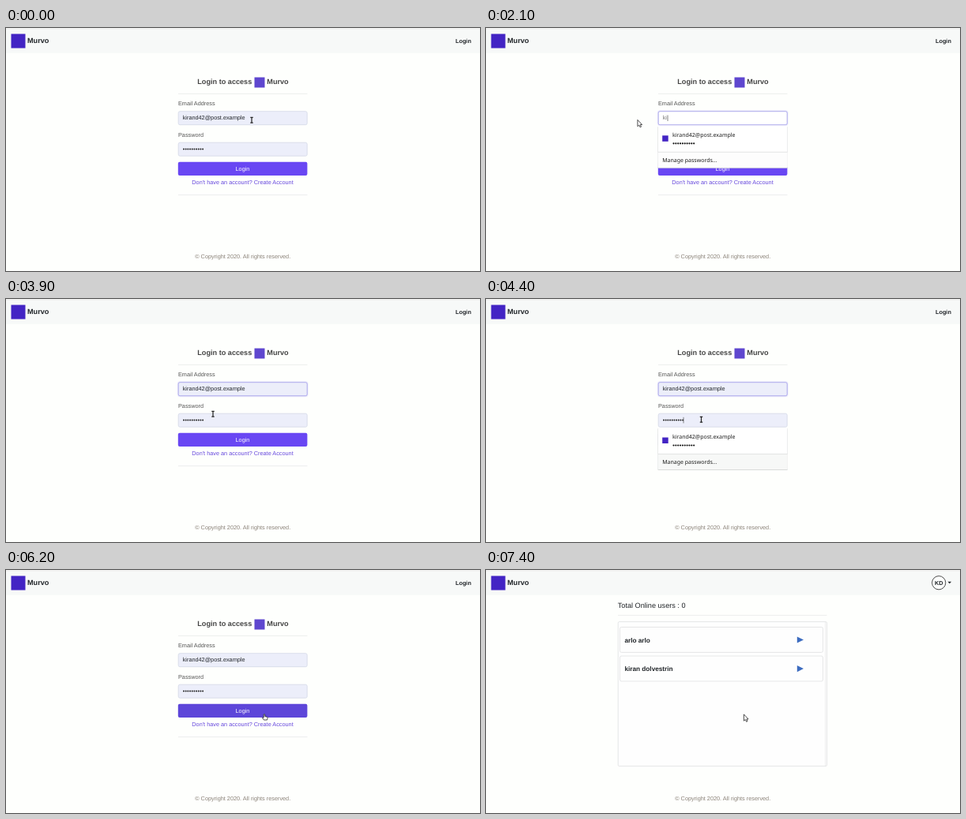
Write an HTML page that moves like this. It is 600 px wide and 308 px high and loops after 8000 ms.

```html
<!DOCTYPE html>
<html lang="en">
<head>
<meta charset="utf-8">
<title>Login</title>
<style>
  html, body { margin: 0; height: 100%; overflow: hidden; background: #fefffd; }
  svg { display: block; width: 100vw; height: 100vh; }
  text { font: 7.3px "Liberation Sans", Arial, sans-serif; fill: #212529; text-rendering: geometricPrecision; white-space: pre; }
  .b { font-weight: bold; }
  .big { font-size: 9.13px; }
  .mid { text-anchor: middle; }
  .label { fill: #555; }
  .ui text { font: 7px "Noto Sans", sans-serif; fill: #1c1c1c; }
  .line { stroke: #e6e7e8; stroke-width: .7; }
  .field { fill: #eceefa; stroke: #d4d8e6; stroke-width: .8; }
  .ring { fill: none; stroke: #7a6cf0; }
  .card { fill: #fefefe; stroke: #dcdddf; stroke-width: .7; }
  .dots { stroke-linecap: round; fill: none; }
  .caret { stroke: #333; stroke-width: .6; }
  #cursor path { stroke: #222; stroke-width: .8; stroke-linejoin: round; fill: #fff; }
  #cursor #beam { stroke-width: 1.2; }
</style>
</head>
<body>
<svg viewBox="0 0 600 308">
  <path d="M0 1H600" stroke="#dfe1e0" stroke-width=".8"/>
  <rect y="2" width="600" height="29.7" fill="#f7f9f8"/>
  <rect x="6.5" y="7.5" width="18" height="18" fill="#4324c4"/>
  <text class="b big" x="27" y="18.8">Murvo</text>
  <text class="mid" x="299.7" y="291.8" style="fill:#8a8178">© Copyright 2020. All rights reserved.</text>

  <g id="login">
    <text class="b" x="569" y="18.8">Login</text>
    <text class="b big" x="242.3" y="71" style="fill:#444">Login to access</text>
    <rect x="314.5" y="62.5" width="13" height="13" fill="#5f47cf"/>
    <text class="b big" x="330.3" y="71" style="fill:#444">Murvo</text>
    <path class="line" d="M218 83.4H381.5M218 211.6H381.5"/>
    <text class="label" x="218" y="98.4">Email Address</text>
    <text class="label" x="218" y="137.8">Password</text>

    <rect id="email" class="field" x="218.2" y="105.7" width="163" height="17" rx="2"/>
    <rect id="selection" y="109" height="10" fill="#b7c8f0"/>
    <text id="typed" x="223.7" y="116.3"></text>
    <path id="emailCaret" class="caret" d="M230 110.5V118"/>
    <g id="emailRing" class="ring">
      <rect x="218.2" y="105.7" width="163" height="17" rx="2" stroke-opacity=".35"/>
      <rect x="217.6" y="105" width="164.2" height="18.4" rx="2.6" stroke-width="1.6" stroke-opacity=".14"/>
    </g>

    <rect class="field" x="218.2" y="145.2" width="163" height="17" rx="2"/>
    <path class="dots" d="M225 153.6H249.5" stroke="#222" stroke-width="2" stroke-dasharray="0 2.68"/>
    <path id="passCaret" class="caret" d="M250 149.8V157.4"/>
    <g id="passRing" class="ring">
      <rect x="218.2" y="145.2" width="163" height="17" rx="2" stroke-opacity=".35"/>
      <rect x="217.6" y="144.5" width="164.2" height="18.4" rx="2.6" stroke-width="1.6" stroke-opacity=".14"/>
    </g>

    <rect id="button" x="217.8" y="169.7" width="163.6" height="17.3" rx="2"/>
    <text class="mid" x="299.5" y="181" style="fill:#fff">Login</text>
    <text class="mid" x="299.5" y="198.4" style="fill:#6546dd">Don't have an account? Create Account</text>

    <g id="popup" class="ui">
      <rect x="217.2" y="124.4" width="164.8" height="53.3" rx="1.5" fill="#d9dbda"/>
      <rect x="217.7" y="123.7" width="163.8" height="53" rx="1" fill="#fff"/>
      <rect id="hover" x="217.7" y="127" width="163.8" height="26.5" fill="#c5c6c2"/>
      <rect id="footer" x="217.7" y="157.5" width="163.8" height="19.2"/>
      <path d="M217.7 157.3H381.5" stroke="#dedfdf" stroke-width=".8"/>
      <rect x="223.2" y="136.3" width="7.5" height="7.5" fill="#4324c4"/>
      <text x="236" y="137.9">kirand42@post.example</text>
      <path class="dots" d="M237.5 146.3H264" stroke="#111" stroke-width="2.2" stroke-dasharray="0 2.85"/>
      <text x="223.2" y="169.6">Manage passwords…</text>
    </g>
  </g>

  <g id="users">
    <circle cx="573.2" cy="16.2" r="8.6" fill="#fbfcfb" stroke="#222" stroke-width=".8"/>
    <text class="b mid" x="573.2" y="18.8">KD</text>
    <path d="M584.5 14.8h4.6l-2.3 2.5z" fill="#212529"/>
    <text class="big" x="166.8" y="47.6">Total Online users : 0</text>
    <path class="line" d="M167 57.4H431.5"/>
    <rect class="card" x="167.2" y="65.6" width="264.3" height="183" rx="1.5"/>
    <path class="line" d="M429.6 66V248.4"/>
    <g id="cards"></g>
  </g>

  <g id="cursor">
    <path id="arrow" d="M-.6 -.6V7.7L1.3 6.1L2.6 8.8L4 8.2L2.8 5.5H5.1Z"/>
    <path id="beam" d="M-1.7 -3.7H1.7M0 -3.7V3.1M-1.7 3.1H1.7"/>
    <path id="hand" d="M-.8 0Q0 -1 .8 0V2.6L3.8 3.3Q4.4 3.6 4.2 4.5L3.5 7H-.6L-2.6 4.3Q-2.4 3.3 -.8 4.2Z"/>
  </g>
</svg>
<script>
const EMAIL = 'kirand42@post.example', LOOP = 8000, STEP = 100;
const el = id => document.getElementById(id);
const show = (id, opacity) => el(id).setAttribute('opacity', +opacity);
const set = (id, attrs) => { for (const k in attrs) el(id).setAttribute(k, attrs[k]); };
const ramp = (t, a, b) => Math.min(1, Math.max(0, (t - a) / (b - a)));
const within = (t, a, b) => t >= a && t < b;

['arlo arlo', 'kiran dolvestrin'].forEach((name, i) => {
  el('cards').innerHTML += `<g transform="translate(0 ${i * 36.6})">
    <rect class="card" x="169.5" y="72.4" width="257" height="32" rx="2"/>
    <text class="b" x="175.4" y="91.7" style="font-size:8.23px">${name}</text>
    <path d="M393.8 84.4L402 88.5L393.8 92.6Z" fill="#3d6cc0"/></g>`;
});

// time, x, y, pointer shape
const path = [
  [0, 311, 117, 'beam'], [200, 311, 117, 'beam'], [600, 214, 117, 'arrow'], [800, 192.5, 117, 'arrow'],
  [2800, 192.5, 117, 'arrow'], [3400, 261, 139.5, 'arrow'], [3700, 261, 139.5, 'arrow'],
  [3900, 262, 146, 'beam'], [4300, 272.5, 153, 'beam'], [4700, 272.5, 153, 'arrow'],
  [5000, 445, 159, 'arrow'], [5100, 445, 159, 'arrow'], [5400, 370, 128, 'arrow'],
  [5900, 328, 178, 'hand'], [6100, 327, 183, 'hand'], [6700, 327, 183.5, 'arrow'], [LOOP, 327, 183.5, 'arrow']
];

function pointer(t) {
  const i = path.findIndex(p => p[0] > t), a = path[i - 1], b = path[i];
  const k = ramp(t, a[0], b[0]), e = k * k * (3 - 2 * k);
  return { x: a[1] + (b[1] - a[1]) * e, y: a[2] + (b[2] - a[2]) * e, kind: a[3] };
}

function draw(t) {
  const p = pointer(t), online = t >= 6700;
  show('login', !online);
  show('users', online);
  set('cursor', { transform: `translate(${p.x} ${p.y})` });
  ['arrow', 'beam', 'hand'].forEach(kind => show(kind, kind === p.kind));

  // email field: select, retype, preview, accept
  const typing = within(t, 1900, 3200), preview = within(t, 3200, 3700);
  const left = Math.max(223.7, Math.min(299, p.x));
  set('selection', { x: left, width: 299 - left });
  show('selection', within(t, 300, 1900));
  el('typed').textContent = typing ? EMAIL.slice(0, (t - 1900) / 100) : EMAIL;
  el('typed').style.cssText = typing ? 'fill:#777' : preview ? 'font-size:6.08px;fill:#333' : '';
  el('email').style.fill = typing ? '#fff' : '';
  show('emailCaret', typing && t >= 2100 && (t - 2100) % 1000 < 500);
  show('emailRing', ramp(t, 200, 400) * (1 - ramp(t, 4400, 4600)));

  show('passCaret', within(t, 4400, 4900));
  show('passRing', ramp(t, 4400, 4600) * (1 - ramp(t, 6000, 6200)));
  set('button', { fill: t >= 5900 ? '#5d46d9' : '#6947f3' });

  // suggestion list, first below the email, then below the password
  const second = t >= 4300, closing = ramp(t, 4900, 5300);
  const scale = 1 - .015 * ramp(t, 4900, 5100);
  show('popup', within(t, 300, 3700) || (second && 1 - closing ** 1.75));
  show('hover', within(t, 3200, 3700));
  set('footer', { fill: second ? '#f7f8f7' : '#fdfdfd' });
  set('popup', {
    transform: `translate(299.6 ${150 + (second ? 39.2 : 0)}) scale(${scale}) translate(-299.6 -150)`
  });
}

// Typing stops after the first two letters.
const shownTime = t => within(t, 2100, 2800) ? t : t;

function tick() {
  const t = performance.now() % LOOP;
  draw(Math.floor(t / STEP) * STEP);
  requestAnimationFrame(tick);
}
tick();
</script>
</body>
</html>
```
